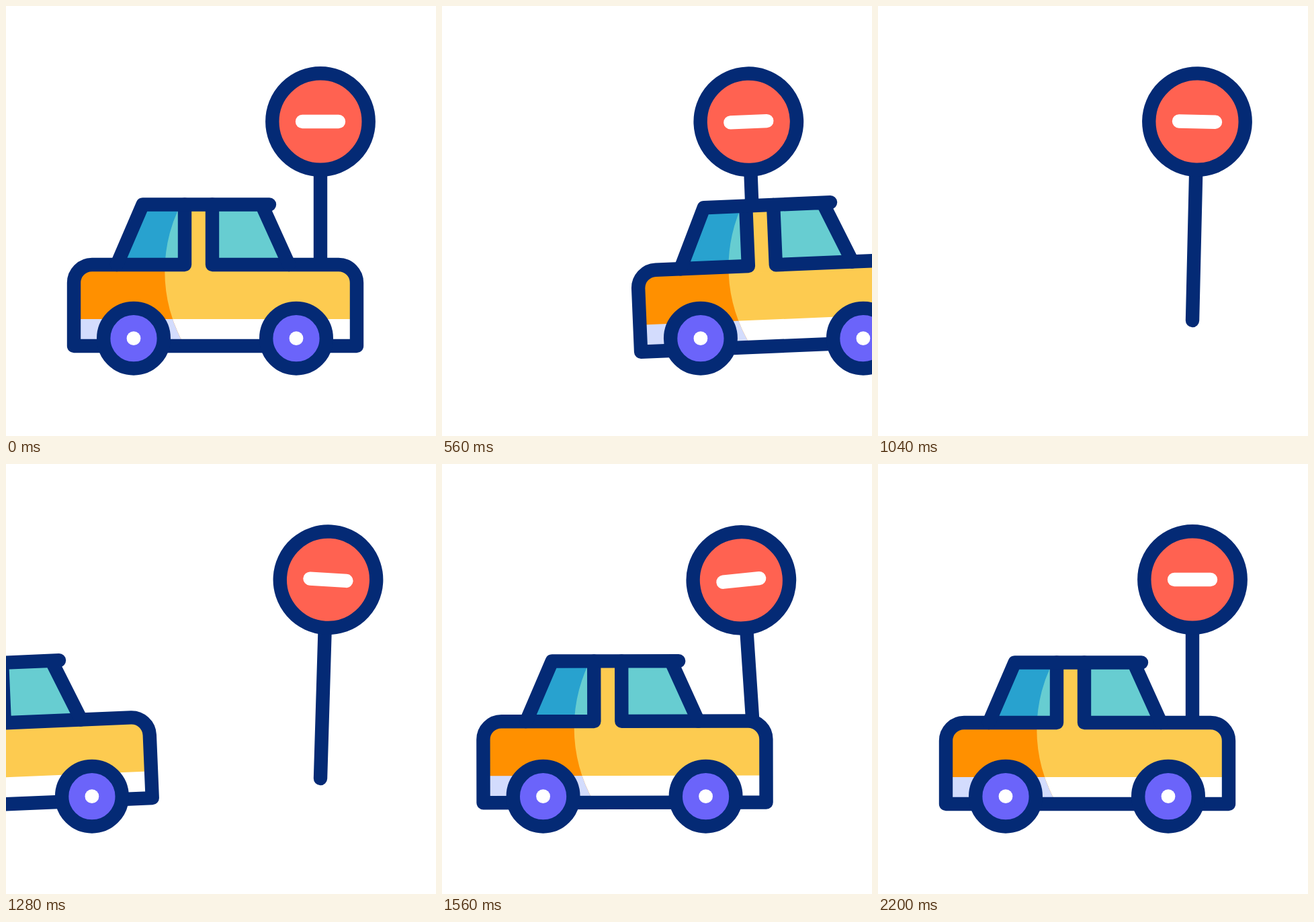
Write an HTML page that moves like this. It is 640 by 640 pixels and loops after 2640 ms.

```html
<!DOCTYPE html>
<html lang="en">
<head>
<meta charset="utf-8">
<title>Car and road sign</title>
<style>
  html, body { margin: 0; width: 100%; height: 100%; overflow: hidden; background: #fff; }
  svg { display: block; width: 100%; height: 100%; }
  .line { fill: none; stroke: #042a75; stroke-width: 20.4; stroke-linecap: round; stroke-linejoin: round; }
  .yellow { fill: #fdcb50; }
  .orange { fill: #ff9000; }
  .white { fill: #fff; }
  .lilac { fill: #d3dcfd; }
  .glass { fill: #67cdd1; }
  .dark-glass { fill: #28a2cf; }
  .violet { fill: #6b64fa; }
  .red { fill: #ff6251; }
  .bar { stroke: #fff; }
</style>
</head>
<body>
<svg viewBox="0 0 640 640">
  <defs>
    <clipPath id="shade"><path d="M265.5 285A222 222 0 0 0 265.5 505H95V285Z"/></clipPath>
    <g id="wheel">
      <circle class="line violet" r="44.8"/>
      <circle class="white" r="10.4"/>
    </g>
  </defs>

  <g id="pole">
    <path class="line" d="M468 468V244"/>
    <g id="head">
      <circle class="line red" cx="468" cy="172" r="71.7"/>
      <path class="line bar" d="M441 172H495"/>
    </g>
  </g>

  <g id="car">
    <g id="body">
      <rect class="yellow" x="101" y="385" width="421" height="121" rx="27"/>
      <rect class="yellow" x="266" y="295" width="41" height="100"/>
      <rect class="white" x="101" y="466" width="421" height="40"/>
      <path class="glass" d="M203 295H266V385H165ZM307 295H380L421 385H307Z"/>
      <g clip-path="url(#shade)">
        <rect class="orange" x="101" y="385" width="421" height="121" rx="27"/>
        <rect class="lilac" x="101" y="466" width="421" height="40"/>
        <path class="dark-glass" d="M203 295H266V385H165Z"/>
      </g>
      <path class="line" d="M266 295.5V385H128a27 27 0 0 0-27 27V506H522V412a27 27 0 0 0-27-27H307V295.5"/>
      <path class="line" d="M165 385L203.5 295.5H392M380.5 295.5L421 385"/>
    </g>
    <use href="#wheel" x="190" y="494.7"/>
    <use href="#wheel" x="432" y="494.7"/>
  </g>
</svg>
<script>
  const LOOP = 2640, STEP = 40;

  const part = (t, from, to) => Math.min(1, Math.max(0, (t - from) / (to - from)));
  const ramp = (t, from, to) => (1 - Math.cos(Math.PI * part(t, from, to))) / 2;
  const bump = (t, from, peak, to) => ramp(t, from, peak) - ramp(t, peak, to);

  // Back up a little, shoot off to the right, come in from the left and brake.
  const drive = t => t < 680
    ? -17 * ramp(t, 0, 400) + 649 * part(t, 400, 680) ** 2
    : -686 * (1 - part(t, 1120, 1960)) ** 3.85;

  // The tail rises while backing up and braking; the nose rises at speed.
  const tail = t => bump(t, 0, 400, 520) + bump(t, 1280, 1800, 2200);
  const nose = t => ramp(t, 400, 520) - ramp(t, 1280, 1800);

  const sway = t => -3.4 * bump(t, 440, 640, 1200)
    + 2.45 * bump(t, 640, 1200, 1560)
    - 3.8 * bump(t, 1200, 1560, 2040);

  const place = (id, transform) =>
    document.getElementById(id).setAttribute("transform", transform);

  function draw(t) {
    const tilt = 1.7 * tail(t) - 2.4 * nose(t);
    place("car", `translate(${drive(t)} 0)`);
    place("body", `translate(0 ${-3.8 * tail(t)}) rotate(${tilt} 311 506)`);
    place("pole", `rotate(${sway(t)} 468 468)`);
    // The head follows the pole a little late.
    place("head", `rotate(${0.75 * sway(t - 90)} 468 253)`);
  }

  const start = performance.now();

  function tick() {
    const t = (performance.now() - start) % LOOP;
    draw(Math.floor(t / STEP) * STEP);
    requestAnimationFrame(tick);
  }
  tick();
</script>
</body>
</html>
```
